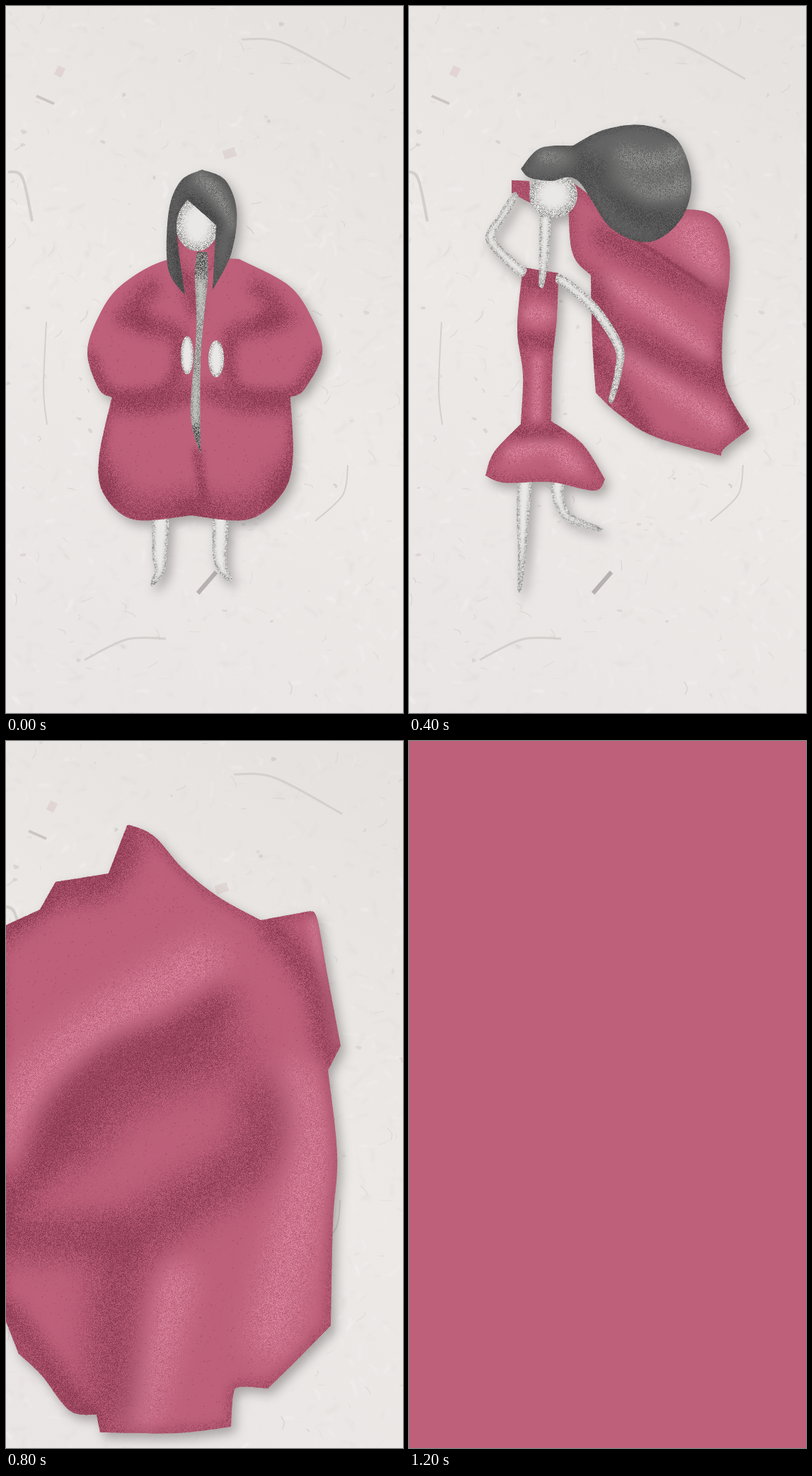
Recreate the animation shown at these times as an HTML page with a canvas. Size 561x998 px, loop 1.4 s.

```html
<!DOCTYPE html>
<html lang="en">
<head>
<meta charset="utf-8">
<title>Coat</title>
<style>
html, body { margin: 0; width: 100%; height: 100%; overflow: hidden; background: #e9e6e4; }
canvas { display: block; width: 561px; height: 998px; }
</style>
</head>
<body>
<canvas id="stage" width="561" height="998"></canvas>
<script>
const W = 561, H = 998, HOLD = 200;
const RED = '#be607a', DARK = '#87384f', LIGHT = '#e595ab';
const HAIR = '#656565', INK = '#414141', ASH = '#a6a6a4', SKIN = '#e9e8e6', SOOT = '#60605e';

let seed = 7;
const rnd = () => (seed = (seed * 1664525 + 1013904223) >>> 0) / 4294967296;

function layer(w = W, h = H) {
  const c = document.createElement('canvas');
  c.width = w;
  c.height = h;
  return c.getContext('2d', { willReadFrequently: true });
}

// Points are "x,y x,y"; a slash marks a sharp corner after the point before it.
const points = text => text.trim().split(/\s+/).filter(Boolean).map(p => p.split(',').map(Number));
const groups = text => text.split('/').map(points);

function spline(path, pts, closed) {
  const n = pts.length;
  const at = i => closed ? pts[(i + n) % n] : pts[Math.max(0, Math.min(n - 1, i))];
  for (let i = 0; i < (closed ? n : n - 1); i++) {
    const [a, b, c, d] = [at(i - 1), at(i), at(i + 1), at(i + 2)];
    path.bezierCurveTo(b[0] + (c[0] - a[0]) / 6, b[1] + (c[1] - a[1]) / 6,
      c[0] - (d[0] - b[0]) / 6, c[1] - (d[1] - b[1]) / 6, c[0], c[1]);
  }
}

function line(pts) {
  const path = new Path2D();
  path.moveTo(...pts[0]);
  spline(path, pts);
  return path;
}

function outline(parts) {
  const path = new Path2D(), first = parts[0][0];
  path.moveTo(...first);
  if (parts.length === 1) spline(path, parts[0], true);
  else {
    let pen = [];
    parts.forEach((part, i) => {
      const seg = [...pen, ...part, ...(i === parts.length - 1 ? [first] : [])];
      spline(path, seg);
      pen = seg.slice(-1);
    });
  }
  path.closePath();
  return path;
}

// Breaks soft shading into grain.
function speckle(g, w, h, amount) {
  const img = g.getImageData(0, 0, w, h), d = img.data;
  for (let i = 3; i < d.length; i += 4) {
    const a = d[i] / 255;
    if (a) d[i] = 255 * (a + (rnd() - .5) * amount * 4 * a * (1 - a));
  }
  g.putImageData(img, 0, 0);
}

const fold = (color, alpha) => (width, text) => ({ color, alpha, width, pts: points(text) });
const dark = fold(DARK, .62), light = fold(LIGHT, .45);
const ink = fold(INK, .6), ash = fold(ASH, .45);
const rim = (color, alpha, width) => ({ color, alpha, width });

// Fills a shape, then shades it with blurred strokes; a fold without points runs along the rim.
function paint(ctx, parts, fill, folds, grain, dots = 0) {
  const path = outline(parts), all = parts.flat();
  const span = (axis, max) => {
    const v = all.map(p => p[axis]), lo = Math.max(0, Math.min(...v) - 10);
    return [lo, Math.min(max, Math.max(...v) + 10) - lo];
  };
  const [x, w] = span(0, W), [y, h] = span(1, H);
  ctx.fillStyle = fill;
  ctx.fill(path);
  const g = layer(w, h);
  g.translate(-x, -y);
  g.clip(path);
  g.lineCap = g.lineJoin = 'round';
  for (const { color, alpha, width, pts } of folds) {
    g.filter = `blur(${width * .35}px)`;
    g.globalAlpha = alpha;
    g.strokeStyle = color;
    g.lineWidth = width;
    g.stroke(pts ? line(pts) : path);
  }
  speckle(g, w, h, grain);
  g.filter = 'none';
  g.fillStyle = DARK;
  for (let i = 0; i < w * h * dots; i++) {
    g.globalAlpha = rnd() * .5;
    g.fillRect(x + rnd() * w, y + rnd() * h, 1.5, 1.5);
  }
  ctx.drawImage(g.canvas, x, y);
}

const cloth = (g, shape, ...folds) => paint(g, groups(shape), RED, [rim(DARK, .35, 18), ...folds], .95, .008);
const hair = (g, shape, ...folds) => paint(g, groups(shape), HAIR, [rim(INK, .35, 12), ...folds], .9);

function oval(g, x, y, rx, ry) {
  const ring = Array.from({ length: 12 }, (_, i) => [x + rx * Math.cos(i * Math.PI / 6), y + ry * Math.sin(i * Math.PI / 6)]);
  paint(g, [ring], SKIN, [rim(SOOT, .4, rx * .5)], 1);
}

// Tapers from one width to another, a little fuller in the middle.
function limb(g, text, from, to) {
  const pts = points(text), n = pts.length - 1;
  const side = s => pts.map(([x, y], i) => {
    const a = pts[Math.max(0, i - 1)], b = pts[Math.min(n, i + 1)];
    const dx = b[0] - a[0], dy = b[1] - a[1], t = i / n;
    const r = s * (from + (to - from) * t) * (1 + .25 * Math.sin(Math.PI * t)) / 2 / Math.hypot(dx, dy);
    return [x - dy * r, y + dx * r];
  });
  paint(g, [side(1), side(-1).reverse()], SKIN, [rim(SOOT, .42, 6)], 1.1);
}

// Points as half-widths around the coat's leaning centre line.
const half = (pts, s) => pts.map(([dx, y]) => [281 - Math.max(0, y - 490) * .085 + s * dx, y]);

function coat(g) {
  const [sleeve, hem] = groups('48,357 118,394 151,440 166,490 145,541 126,552/137,640 125,690 80,725 0,719');
  const shape = [half(sleeve, 1), [...half(hem, 1), ...half([sleeve[5], ...hem], -1).reverse()],
    half(sleeve.slice(0, 5), -1).reverse()];
  const folds = [
    dark(45, '132,670 90,718 0,716'), dark(20, '137,570 137,640 115,700'), dark(25, '120,562 60,562 15,545'),
    dark(18, '162,495 130,546 60,545 38,520 35,478'), dark(24, '115,440 80,450 38,464'), dark(24, '75,398 100,425 84,446')
  ];
  const both = folds.flatMap(f => [1, -1].map(s => ({ ...f, pts: half(f.pts, s) })));
  paint(g, shape, RED, [...both, dark(12, '270,630 280,695'), dark(20, '252,370 268,430')], .95, .008);
}

const poses = [
  g => {
    limb(g, '218,722 217,775 217,798 206,817', 22, 6);
    limb(g, '303,718 302,775 307,796 317,811', 21, 6);
    coat(g);
    cloth(g, '240,322/299,330/306,352 270,385 230,352/');
    paint(g, groups('270,347 284,347/285,385 275,500 275,633/261,575 269,460 267,380'), '#c4c4c1',
      [rim(SOOT, .4, 7), ink(20, '277,345 277,375'), ink(12, '268,595 273,633')], 1.1);
    oval(g, 256, 493, 9, 27);
    oval(g, 297, 498, 11, 26);
    oval(g, 270, 309, 30, 37);
    hair(g, '277,231 310,246 326,290 318,350 292,401/297,309/256,273/241,310 253,408/229,370 230,290 247,247',
      ash(18, '272,238 300,268 318,310'), ink(22, '258,270 302,308'), ink(12, '237,330 248,400'));
  },
  g => {
    limb(g, '259,722 256,775 248,802 235,823', 24, 6);
    limb(g, '328,720 330,775 336,806 343,828', 18, 6);
    limb(g, '318,372 352,428 368,472 350,530 341,585', 10, 9);
    cloth(g, '232,318 308,313 315,328 304,349/300,385 215,360/', dark(24, '270,330 290,390'));
    cloth(g, '210,349 160,389 117,433 100,475 83,540 75,590 81,620 128,661/135,660 150,710 190,732 225,735 302,725/393,720/345,684 332,640 327,570 329,500 335,450 319,369/300,385 260,395',
      light(60, '180,395 125,445 98,570'), light(34, '235,605 165,680'), light(22, '320,430 318,520 310,650'),
      dark(45, '215,378 300,405'), dark(60, '262,400 240,520 200,585'), dark(36, '122,655 195,595 225,540'),
      dark(26, '288,430 280,540 290,715'), dark(5, '285,390 302,418 291,570 302,723'), dark(28, '310,600 315,710'));
    limb(g, '296,294 297,345 299,387', 15, 9);
    oval(g, 299, 262, 33, 37);
    hair(g, '262,203 290,194 328,199 342,219 325,232 278,234/266,270 274,360 249,387/225,362 237,310 247,235',
      ash(16, '315,203 340,222'), ash(18, '262,310 258,372'), ink(24, '245,310 262,225 325,227'));
  },
  g => {
    limb(g, '163,670 161,720 160,770 156,824', 19, 5);
    limb(g, '210,668 211,695 226,722 270,739', 17, 6);
    cloth(g, '145,246/170,247/172,278/145,264/');
    cloth(g, '225,245 300,290 390,287 430,296 450,330 453,380 443,460 447,535 481,597/446,624 441,635/345,607 295,575 264,546/259,470 257,380/230,345',
      light(48, '400,315 430,385'), light(26, '285,390 350,430 420,490'), light(26, '310,490 370,540 445,590'),
      dark(32, '275,325 350,365 440,415'), dark(34, '265,400 290,455 440,530'), dark(24, '265,490 330,595'),
      dark(22, '450,480 470,590'), dark(5, '320,330 370,362 418,395'));
    cloth(g, '161,369/211,377/209,440 203,500 201,586/245,618 277,668/262,684 200,672 135,673 108,663/120,630 158,590/161,520 153,455',
      light(22, '168,434 200,436'), light(22, '145,632 195,620 235,650'), light(12, '182,500 180,580'),
      dark(20, '155,470 205,475'), dark(26, '170,388 200,395'), dark(20, '155,602 208,602'));
    limb(g, '163,377 140,358 115,327 132,297 151,266', 13, 9);
    limb(g, '211,384 260,425 296,480 296,515 285,558', 13, 7);
    limb(g, '192,296 191,350 187,395', 15, 7);
    oval(g, 204, 267, 34, 32);
    hair(g, '158,230 185,201 232,197/275,175 330,168 378,188 399,245 385,300 340,333 285,313 238,246 200,247 170,242',
      ash(28, '305,213 350,222 390,205'), ash(28, '290,245 345,265 395,250'), ash(20, '190,210 230,218'),
      ink(36, '235,220 275,245 320,295 370,300'));
  },
  g => {
    hair(g, '250,240 262,214 292,206 328,225 334,251 370,260 440,269 478,262 492,250/498,265 490,320 494,368/440,375 412,362 325,297/327,268 275,262',
      ash(18, '345,262 420,275 490,265'), ash(20, '400,325 495,305'), ash(18, '258,225 290,215'), ink(34, '280,255 330,260 430,345 490,350'));
    oval(g, 293, 283, 33, 24);
    limb(g, '299,300 299,328', 14, 14);
    cloth(g, '-9,299 28,264 65,228 100,200 125,196 165,210 208,230 255,280 298,321/350,332 383,352/384,395 420,475 430,512 495,565 508,590 497,650 461,715 447,795 425,854/365,848 250,875 155,882 60,840 35,795 -9,718/',
      dark(16, '325,345 345,395 390,440'),
      light(60, '-10,410 60,350 145,280'), light(34, '125,815 145,630 250,475'), light(50, '320,345 280,480'), light(55, '365,650 370,740 410,820'),
      dark(36, '-5,300 65,245'), dark(46, '-10,500 60,485 150,390 250,332'), dark(46, '165,870 170,730 205,590'),
      dark(32, '310,840 290,720 315,600 400,470'), dark(38, '480,685 435,700'), dark(34, '400,440 430,525 490,575'));
  },
  g => cloth(g, '-9,264 48,238/70,199/145,187/170,122/176,119 210,135 250,180 300,220 360,253/430,240/440,252 455,335 473,430/455,465/468,585 462,680 459,825/410,875 370,914/330,912 321,924 318,968/240,977 133,976/128,951/90,945 50,895 18,865/-9,797/',
    light(60, '-10,570 40,485 130,405 280,310'), light(16, '435,255 447,330 466,425'), light(60, '410,480 425,600 375,840'), light(50, '240,760 190,950'),
    dark(40, '-5,265 65,215 140,200 175,140'), dark(46, '-10,665 45,605 85,515 160,445 230,420 305,370'), dark(75, '85,570 160,490 300,430'),
    dark(65, '360,500 350,585 210,680 160,750 150,940'), dark(60, '-5,700 150,700'), dark(34, '375,262 435,345 455,435'), dark(30, '0,800 110,950')),
  g => cloth(g, '-9,215 55,199 97,168/99,144 130,130 180,120 212,88/303,95/338,35/347,30 375,50 406,112 444,170 507,230/570,230/570,474/553,475 547,520 535,555/533,590 548,625 570,675/570,815/552,860 570,920/570,1010/95,1005/68,950 61,908/20,900 -9,860/',
    light(65, '-10,510 50,410 130,335 240,260 400,195'), light(40, '490,255 530,360'), light(50, '500,510 400,635 150,760'), light(55, '500,620 460,850 510,960'),
    dark(36, '-5,225 100,170 205,105'), dark(26, '300,100 345,45'), dark(26, '385,80 430,165 505,235'),
    dark(55, '-10,605 70,575 170,410 280,350 415,315'), dark(60, '80,600 160,520 250,430'), dark(5, '340,315 465,275'),
    dark(22, '110,725 330,640 430,565 480,485'), dark(46, '460,665 410,865 250,920 220,960'), dark(24, '80,930 85,840 130,730'),
    dark(30, '525,235 556,310 540,560'), dark(28, '540,590 552,800 560,950'))
];

function makePaper() {
  const g = layer(W + 40, H);
  const tone = g.createLinearGradient(0, H, W, 0);
  ['#e9e5e4', '#ece9e7', '#e4e1df'].forEach((c, i) => tone.addColorStop(i / 2, c));
  g.fillStyle = tone;
  g.fillRect(0, 0, W + 40, H);
  const flecks = (count, length, width, alpha, colors) => {
    for (let i = 0; i < count; i++) {
      const x = rnd() * (W + 40), y = rnd() * H, a = rnd() * Math.PI, l = length * (.2 + rnd());
      g.globalAlpha = alpha * (.3 + rnd());
      g.strokeStyle = colors[i % colors.length];
      g.lineWidth = width * (.4 + rnd());
      g.stroke(line([[x, y], [x + l * Math.cos(a) / 2 + rnd() * 4, y + l * Math.sin(a) / 2], [x + l * Math.cos(a), y + l * Math.sin(a)]]));
    }
  };
  g.lineCap = 'round';
  g.filter = 'blur(1.5px)';
  flecks(900, 18, 4, .2, ['#fff', '#dad6d4']);
  g.filter = 'blur(.5px)';
  flecks(200, 15, 1.3, .4, ['#c4bfbc', '#d5cdc6']);
  flecks(80, 4, 3, .35, ['#bdb8b6', '#d0c2bf']);
  g.translate(20, 0);
  g.lineCap = 'butt';
  const fibre = (width, color, text) => {
    g.globalAlpha = .8;
    g.lineWidth = width;
    g.strokeStyle = color;
    g.stroke(line(points(text)));
  };
  fibre(3, '#cfcccb', '322,47 380,52 475,103');
  fibre(4, '#cdc8c6', '-8,234 12,242 26,304');
  fibre(2, '#cfcac7', '46,446 42,540 47,591');
  fibre(2, '#cdc8c6', '472,648 465,690 426,727');
  fibre(3, '#cfcbc9', '100,923 160,894 215,893');
  fibre(6, '#aaa6a4', '260,829 286,799');
  fibre(4, '#c3bebc', '32,127 57,138');
  fibre(14, '#dfcfcd', '60,90 70,95');
  fibre(18, '#dcd2d0', '303,202 307,214');
  return g.canvas;
}

const paper = makePaper();
const pictures = poses.map((pose, i) => {
  const figure = layer(), g = layer();
  pose(figure);
  g.drawImage(paper, i ? -20 : -9, 0);
  g.shadowColor = 'rgba(60,55,55,.38)';
  g.shadowBlur = 15;
  g.shadowOffsetX = 6;
  g.shadowOffsetY = 8;
  g.drawImage(figure.canvas, 0, 0);
  return g.canvas;
});

const ctx = document.getElementById('stage').getContext('2d');
const start = performance.now();

function draw() {
  const i = Math.floor((performance.now() - start) / HOLD) % (pictures.length + 1);
  if (i < pictures.length) {
    ctx.drawImage(pictures[i], 0, 0);
  } else {
    ctx.fillStyle = RED;
    ctx.fillRect(0, 0, W, H);
  }
  requestAnimationFrame(draw);
}
draw();
</script>
</body>
</html>
```
